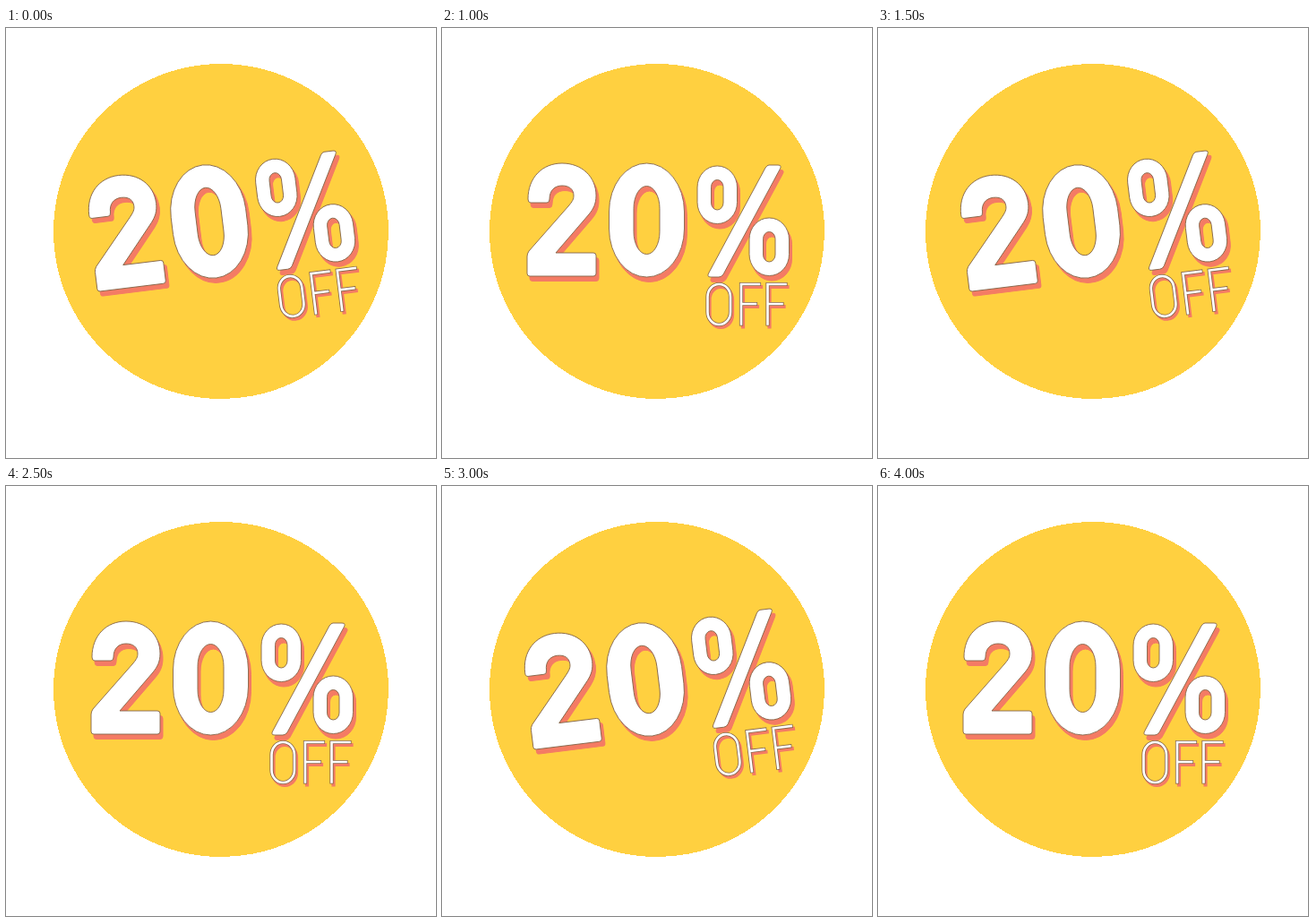
An HTML page that plays this animation: 480 by 480 pixels, repeating every 4500 ms.

```html
<!DOCTYPE html>
<html lang="en">
<head>
<meta charset="utf-8">
<title>20% off</title>
<style>
  html, body { margin: 0; height: 100%; overflow: hidden; background: #fff; }
  svg { display: block; width: 100%; height: 100%; }
  .shadow { fill: #f47b64; stroke: #f47b64; }
  .face { fill: #fff; stroke: #85664a; stroke-width: .9; }
  .thin { fill: none; stroke-linecap: square; stroke-width: 4.2; }
  .core { stroke: #fff; stroke-width: 2.6; }
</style>
</head>
<body>
<svg viewBox="0 0 480 480" role="img" aria-label="20% OFF">
  <defs>
    <path id="bold" fill-rule="evenodd"/>
    <path id="slash" d="M365 153H375Q380 153 377 158L314 275Q312 278 309 278H300Q295 278 298 273L361 156Q363 153 365 153Z"/>
    <path id="off"/>
  </defs>
  <circle cx="240" cy="227" r="187" fill="#ffd040" shape-rendering="crispEdges"/>
  <g id="label">
    <g class="shadow" transform="translate(3 5.5)">
      <use href="#bold"/>
      <use href="#slash"/>
    </g>
    <g class="face">
      <use href="#bold"/>
      <use href="#slash"/>
    </g>
    <use href="#off" class="shadow thin" transform="translate(2 3)"/>
    <use href="#off" class="face thin"/>
    <use href="#off" class="thin core"/>
  </g>
</svg>
<script>
  const byId = id => document.getElementById(id);

  // Rounded rectangle with elliptical corners
  const pill = (left, top, right, bottom, rx, ry) => {
    const arc = (x, y) => `A${rx} ${ry} 0 0 1 ${x} ${y}`;
    return `M${left + rx} ${top}H${right - rx}${arc(right, top + ry)}V${bottom - ry}` +
      `${arc(right - rx, bottom)}H${left + rx}${arc(left, bottom - ry)}V${top + ry}${arc(left + rx, top)}Z`;
  };

  const two = `M99 195Q96 195 96 191C96 167 112 151 134 151C156 151 172 166 172 187
    C172 196 169 202 164 208L127 251H169Q172 251 172 254V274Q172 277 169 277H98
    Q95 277 95 274V255Q95 252 97 249L141 199C146 193 147 191 147 187
    C147 180 142 176 134 176C126 176 120 181 120 191Q120 195 117 195Z`;
  const zero = pill(186.5, 151, 270.5, 278, 42, 54) + pill(214, 176.5, 243, 252.5, 14.5, 25);
  const ring = (x, y) => pill(x, y, x + 44.5, y + 64.5, 22, 24) + pill(x + 15.5, y + 15.5, x + 29, y + 49, 6.7, 8);
  const letterF = x => `M${x + 20} 286H${x}V330.5M${x} 308H${x + 16}`;

  byId('bold').setAttribute('d', two + zero + ring(285, 154) + ring(343, 212));
  byId('off').setAttribute('d', pill(296.5, 286, 322, 331, 12.5, 14) + letterF(334) + letterF(363.5));

  const angles = [-7, 8, 0];
  const label = byId('label');

  function draw(now) {
    const angle = angles[Math.floor(now / 500) % angles.length];
    label.setAttribute('transform', `rotate(${angle} 240 227)`);
    requestAnimationFrame(draw);
  }
  draw(performance.now());
</script>
</body>
</html>
```
